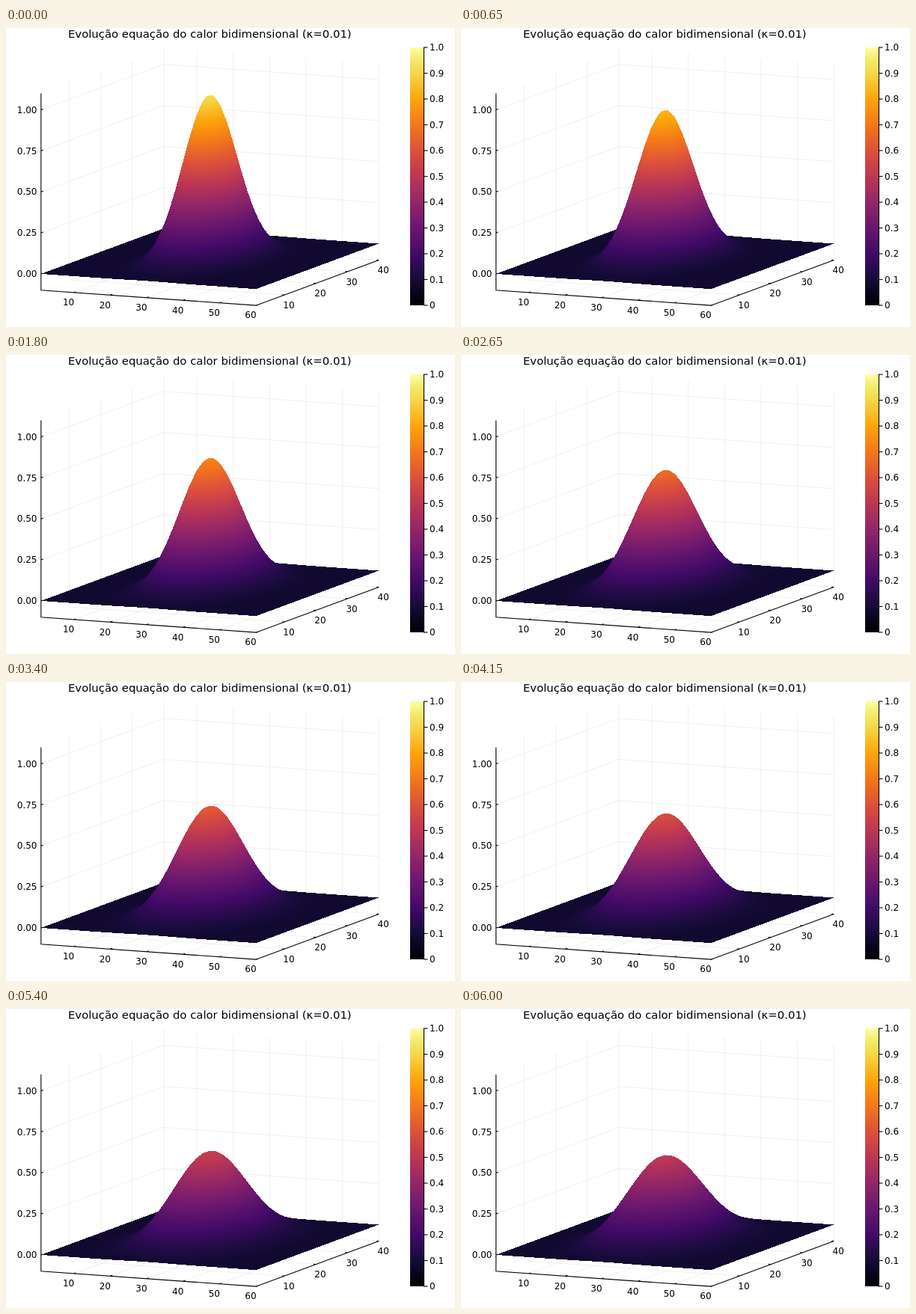
These frames come from a looping animation (600 by 400 pixels, 6050 ms). An HTML page with a canvas:

```html
<!DOCTYPE html>
<html lang="pt">
<head>
<meta charset="utf-8">
<style>
  html, body { margin: 0; width: 600px; height: 400px; overflow: hidden; background: #fff; }
  svg, canvas { position: absolute; left: 0; top: 0; display: block; }
  text { font-family: "DejaVu Sans", sans-serif; font-size: 12px; }
</style>
</head>
<body>
<svg id="plot" width="600" height="400" viewBox="0 0 600 400"></svg>
<canvas id="surface" width="600" height="400"></canvas>
<script>
const W = 600, H = 400, NX = 60, NY = 40;
const FRAME_MS = 50, FRAMES = 121;
const Z_MIN = -0.1, Z_MAX = 1.1;
const START_VARIANCE = 31.7, DIFFUSION = 0.125;

// Orthographic projection of grid coordinates (1..60, 1..40) and height.
const project = (x, y, z) => [
  46.8 + (x - 1) * 287.2 / 59 + (y - 1) * 164.2 / 39,
  328.9 + (x - 1) * 20.3 / 59 - (y - 1) * 60.7 / 39 - z * 219.5
];

// Inferno colour map
const STOPS = [
  [0, 0, 0, 4], [.05, 7, 5, 27], [.1, 22, 11, 57], [.2, 66, 10, 104],
  [.3, 106, 23, 110], [.4, 147, 38, 103], [.5, 188, 55, 84], [.6, 221, 81, 58],
  [.7, 243, 120, 25], [.8, 252, 165, 10], [.9, 246, 215, 70],
  [.95, 242, 234, 105], [1, 252, 255, 164]
];
function inferno(v) {
  let i = 1;
  while (i < STOPS.length - 1 && v > STOPS[i][0]) i++;
  const a = STOPS[i - 1], b = STOPS[i], k = (v - a[0]) / (b[0] - a[0]);
  return [1, 2, 3].map(c => Math.round(a[c] + (b[c] - a[c]) * k));
}
const SHADES = 1024;
const palette = Uint32Array.from({ length: SHADES }, (_, i) => {
  const [r, g, b] = inferno(i / (SHADES - 1));
  return (255 << 24 | b << 16 | g << 8 | r) >>> 0;
});

// Static axes, grid, title and colour bar
function buildPlot() {
  const out = [];
  const path = (pts, style) =>
    out.push(`<polyline points="${pts.map(p => p.join()).join(' ')}" fill="none" ${style}/>`);
  const grid = (...pts) => path(pts.map(p => project(...p)), 'stroke="#000" stroke-opacity=".1" stroke-width=".65"');
  const axis = (...pts) => path(pts, 'stroke="#000" stroke-width="1.1"');
  const label = (x, y, s, anchor = 'middle') =>
    out.push(`<text x="${x}" y="${y}" text-anchor="${anchor}">${s}</text>`);

  for (let x = 10; x <= NX; x += 10) {
    grid([x, 1, Z_MIN], [x, NY, Z_MIN], [x, NY, Z_MAX]);
    const [px, py] = project(x, 1, Z_MIN);
    axis([px, py], [px + 2.8, py - 1]);
    label(px - 7, py + 17.3, x);
  }
  for (let y = 10; y <= NY; y += 10) {
    grid([NX, y, Z_MIN], [1, y, Z_MIN], [1, y, Z_MAX]);
    const [px, py] = project(NX, y, Z_MIN);
    axis([px, py], [px - 3, py - .2]);
    label(px + 6, py + 17.6, y);
  }
  for (let z = 0; z <= 1; z += .25) {
    grid([1, 1, z], [1, NY, z], [NX, NY, z]);
    const [px, py] = project(1, 1, z);
    axis([px, py], [px + 2.8, py - 1]);
    label(41.5, py + 4.3, z.toFixed(2), 'end');
  }
  axis(project(1, 1, Z_MAX), project(1, 1, Z_MIN), project(NX, 1, Z_MIN), project(NX, NY, Z_MIN));

  const stops = STOPS.map(([v, ...c]) => `<stop offset="${v}" stop-color="rgb(${c})"/>`).join('');
  out.push(`<linearGradient id="bar" x1="0" y1="1" x2="0" y2="0">${stops}</linearGradient>`,
    '<rect x="540" y="26" width="18" height="345" fill="url(#bar)"/>');
  axis([558.5, 26], [558.5, 371]);
  for (let i = 0; i <= 10; i++) {
    const y = 371 - i * 34.5;
    axis([558, y], [563.5, y]);
    label(566, y + 4.3, i ? (i / 10).toFixed(1) : '0', 'start');
  }
  out.push('<text x="272.3" y="13" text-anchor="middle" style="font-size:14.85px">' +
    'Evolução equação do calor bidimensional (κ=0.01)</text>');
  document.getElementById('plot').innerHTML = out.join('');
}

// Explicit heat equation with fixed borders
function simulate() {
  let u = new Float64Array(NX * NY);
  for (let j = 0; j < NY; j++) for (let i = 0; i < NX; i++) {
    const dx = i - (NX - 1) / 2, dy = j - (NY - 1) / 2;
    u[j * NX + i] = Math.exp(-(dx * dx + dy * dy) / (2 * START_VARIANCE));
  }
  const states = [u];
  while (states.length < FRAMES) {
    const next = u.slice();
    for (let j = 1; j < NY - 1; j++) for (let i = 1; i < NX - 1; i++) {
      const k = j * NX + i;
      next[k] += DIFFUSION * (u[k - 1] + u[k + 1] + u[k - NX] + u[k + NX] - 4 * u[k]);
    }
    states.push(u = next);
  }
  return states;
}

const ctx = document.getElementById('surface').getContext('2d');
const image = ctx.createImageData(W, H);
const pixels = new Uint32Array(image.data.buffer);

// Fills a triangle of [x, y, height] vertices without antialiasing.
function fillTriangle(a, b, c) {
  const area = (b[0] - a[0]) * (c[1] - a[1]) - (b[1] - a[1]) * (c[0] - a[0]);
  if (Math.abs(area) < 1e-9) return;
  const x0 = Math.ceil(Math.min(a[0], b[0], c[0]) - .5), x1 = Math.floor(Math.max(a[0], b[0], c[0]) - .5);
  const y0 = Math.ceil(Math.min(a[1], b[1], c[1]) - .5), y1 = Math.floor(Math.max(a[1], b[1], c[1]) - .5);
  for (let y = y0; y <= y1; y++) for (let x = x0; x <= x1; x++) {
    const px = x + .5 - a[0], py = y + .5 - a[1];
    const v = (px * (c[1] - a[1]) - py * (c[0] - a[0])) / area;
    const w = (py * (b[0] - a[0]) - px * (b[1] - a[1])) / area;
    if (v < -1e-7 || w < -1e-7 || v + w > 1 + 1e-7) continue;
    const z = a[2] + v * (b[2] - a[2]) + w * (c[2] - a[2]);
    pixels[y * W + x] = palette[Math.round((z - Z_MIN) / (Z_MAX - Z_MIN) * (SHADES - 1))];
  }
}

function drawSurface(u) {
  pixels.fill(0);
  const points = Array.from(u, (z, k) => [...project(k % NX + 1, Math.floor(k / NX) + 1, z), z]);
  // Far cells first
  for (let j = NY - 2; j >= 0; j--) for (let i = 0; i < NX - 1; i++) {
    const k = j * NX + i;
    fillTriangle(points[k], points[k + NX], points[k + NX + 1]);
    fillTriangle(points[k], points[k + 1], points[k + NX + 1]);
  }
  ctx.putImageData(image, 0, 0);
}

buildPlot();
const states = simulate();
const start = performance.now();
let shown = -1;
function tick() {
  const frame = Math.floor((performance.now() - start) / FRAME_MS) % FRAMES;
  if (frame !== shown) drawSurface(states[shown = frame]);
  requestAnimationFrame(tick);
}
tick();
</script>
</body>
</html>
```
